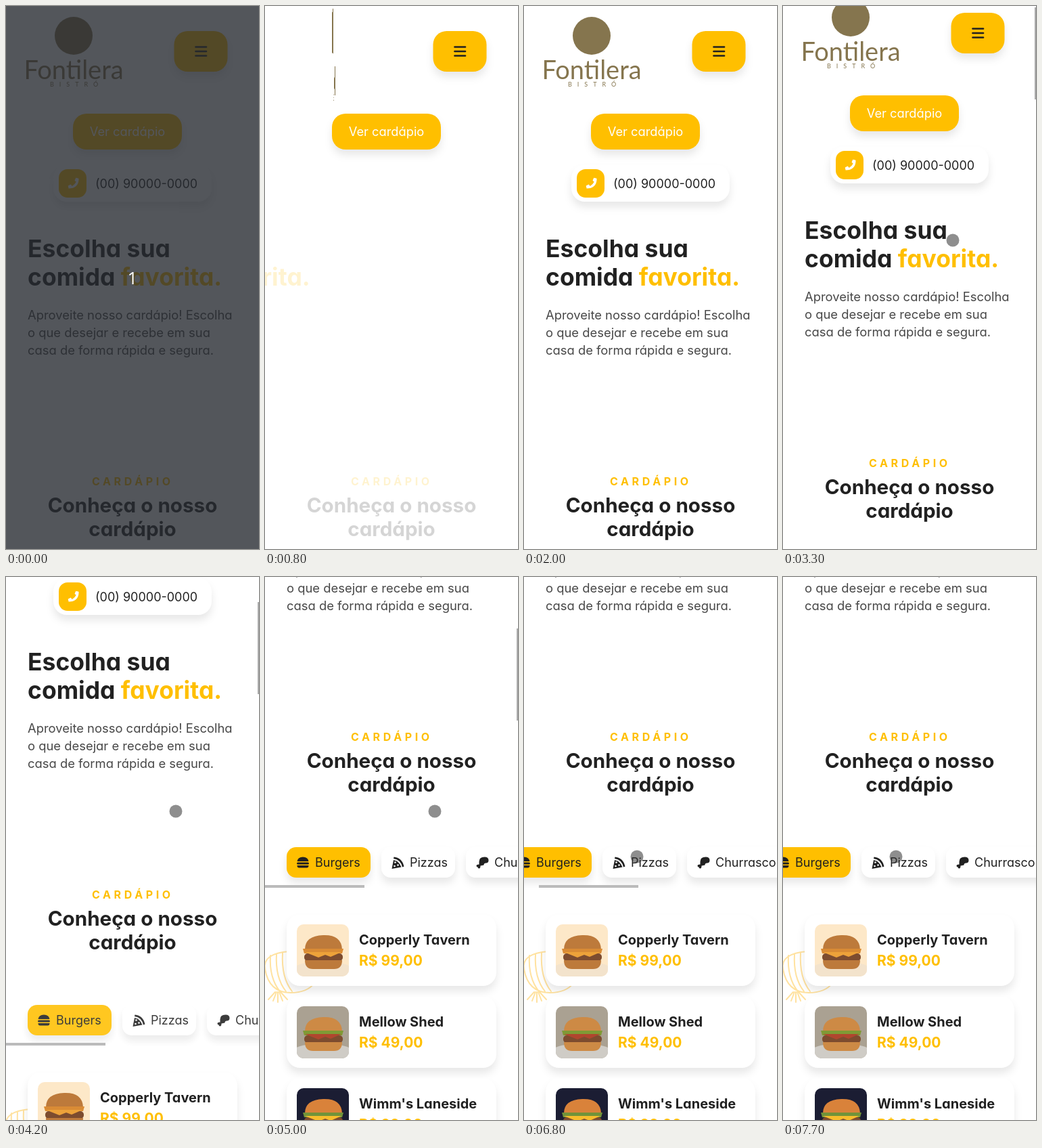
An HTML page that plays this animation: 374x802 px, repeating every 8 s.

```html
<!DOCTYPE html>
<html lang="pt-BR">
<head>
<meta charset="utf-8">
<title>Cardápio</title>
<style>
html, body { margin: 0; width: 100%; height: 100%; overflow: hidden; background: #fff; }
#stage { position: absolute; left: 0; top: 0; width: 374px; height: 802px; overflow: hidden; background: #fff; }
#stage svg, #stage div { position: absolute; left: 0; top: 0; }
svg { font-family: Inter, "Open Sans", sans-serif; font-feature-settings: "cv11"; font-size: 18px; fill: #212121; overflow: visible; }
.gold { fill: #ffbf00; }
.white { fill: #fff; }
.lift { filter: drop-shadow(0 8px 6px rgba(0, 0, 0, .09)); }
.big { font-size: 35.5px; font-weight: 700; }
.mid { font-size: 29.6px; font-weight: 700; text-anchor: middle; }
.tag { font-size: 16px; font-weight: 700; letter-spacing: 4.6px; }
.para { font-size: 18.4px; fill: #484848; }
.name { font-size: 20px; font-weight: 700; }
.price { font-size: 21px; font-weight: 700; }
.onion { fill: none; stroke: #ffe2a0; stroke-width: 2; stroke-linecap: round; }
#logo { transform-origin: 100px 67px; fill: #85754e; font-family: Lato, sans-serif; }
#stage #vbar { left: 372px; width: 2px; height: 136px; background: #aaa; }
#stage #dot { left: -9.5px; top: -9.5px; width: 19px; height: 19px; border-radius: 50%; background: rgba(50, 50, 50, .55); }
#stage #cover { width: 374px; height: 802px; background: rgba(38, 42, 49, .793); color: #fff; font: 26px/802px "Open Sans", sans-serif; text-align: center; }
</style>
</head>
<body>
<div id="stage">
  <div id="page">
    <svg width="374" height="1320" viewBox="0 0 374 1320">
      <clipPath id="round"><rect width="77" height="77" rx="10"/></clipPath>

      <rect class="gold lift" x="248.5" y="37" width="79" height="60" rx="20"/>
      <path d="M280.500 60.500h15.500m-15.500 6.500h15.500m-15.500 6.500h15.500" stroke="#212121" stroke-width="2.7" stroke-linecap="round"/>
      <rect class="gold lift" x="99" y="159" width="161" height="53" rx="20"/>
      <text class="white" x="179.5" y="192" text-anchor="middle" font-size="18.3">Ver cardápio</text>

      <g id="phone">
        <rect class="white lift" x="70" y="235" width="234" height="54" rx="20"/>
        <rect class="gold" x="78" y="241" width="41" height="42" rx="13"/>
        <path class="white" transform="translate(90 253.5)" d="M17 1l-3.800-.8-1.700 4 2.200 2q-2.200 4.300-6 6.200l-2-2.300-4 1.800.9 4q14.500 0 15-14z"/>
        <text x="132" y="269">(00) 90000-0000</text>
      </g>

      <g id="head" class="big">
        <text x="32" y="371">Escolha sua</text>
        <text x="32" y="413">comida <tspan class="gold">favorita.</tspan></text>
      </g>

      <g id="para" class="para">
        <text x="32" y="463">Aproveite nosso cardápio! Escolha</text>
        <text x="32" y="489">o que desejar e recebe em sua</text>
        <text x="32" y="515">casa de forma rápida e segura.</text>
      </g>

      <g id="menu">
        <text class="tag gold" x="127" y="708">CARDÁPIO</text>
        <text class="mid" x="187" y="748">Conheça o nosso</text>
        <text class="mid" x="187" y="783">cardápio</text>
      </g>

      <g id="tabs"></g>
      <rect id="hbar" y="921" width="147" height="4" fill="#bbb"/>
      <path id="onion" class="onion"/>
      <g id="cards"></g>
    </svg>
    <svg id="logo" width="200" height="134" viewBox="0 0 200 134">
      <circle cx="100" cy="44" r="28"/>
      <text x="100" y="108" text-anchor="middle" font-size="38">Fontilera</text>
      <text x="65" y="119" font-size="9" letter-spacing="8">BISTRÓ</text>
    </svg>
  </div>
  <div id="vbar"></div>
  <div id="dot"></div>
  <div id="cover">1</div>
</div>
<script>
const $ = id => document.getElementById(id);

const icons = {
  bun: '<path d="M0 6.500Q1 0 8.500 0T17 6.500zM1 8h15a1.500 1.500 0 0 1 0 3H1a1.500 1.500 0 0 1 0-3zM0 12.500h17q0 3.500-3 3.500H3q-3 0-3-3.500z"/>',
  slice: '<path d="M3 0Q15 1 18 14l-2.500 1Q13 4 2.500 2.600z"/><path d="M2.500 4.500Q11 6 14 15L0 17.500z"/><g class="white"><circle cx="5" cy="8" r="1.3"/><circle cx="9" cy="12" r="1.3"/><circle cx="4" cy="13.5" r="1.3"/></g>',
  leg: '<path d="M18 5q0 4-4 4-3 0-3 3l-5 1q0 4-2 4-2 0-2-2-2 0-2-2 0-2 4-2V7q0-7 8-7 6 0 6 5z"/>'
};
let left = 32;
const tab = (width, label, icon, cls) => {
  const x = left;
  left += width + 16;
  return `<rect class="${cls} lift" x="${x}" y="865" width="${width}" height="45" rx="14"/>
    <g transform="translate(${x + 15.5} 879.5)">${icons[icon]}</g>
    <text x="${x + 42}" y="894">${label}</text>`;
};
$('tabs').innerHTML = tab(124, 'Burgers', 'bun', 'gold') +
  tab(109, 'Pizzas', 'slice', 'white') + tab(150, 'Churrasco', 'leg', 'white');

// Onion: outline, ribs, then roots
let onion = 'M36 1019Q-4 1022 0 1045Q6 1080 38 1080Q62 1080 73 1066';
for (let i = 0; i < 3; i++) onion += `M${8 + i * 9} ${1025 - i * 2}Q${6 + i * 9} 1058 ${22 + i * 9} 1078`;
for (let i = 0; i < 5; i++) onion += `M${15 + i * 2} 1079l${i * 5 - 10} ${15 - Math.abs(i - 2) * 2}`;
$('onion').setAttribute('d', onion);

const photo = (wall, table, bun, sauce, leaf) =>
  `<rect width="77" height="77" fill="${wall}"/>
   <ellipse cx="38" cy="68" rx="46" ry="13" fill="${table}"/>
   <path fill="${bun}" d="M12 37Q12 17 39 16T67 37z"/>
   <path fill="${leaf}" d="M9 36h60l-2 7H11z"/>
   <rect x="11" y="43" width="57" height="11" rx="5" fill="#7d4c2f"/>
   <path fill="${sauce}" d="M12 41h54L50 48l-8-3-10 4z"/>
   <path fill="${bun}" d="M12 53h55q0 13-12 13H24Q12 66 12 53z"/>`;
const items = [
  ['Copperly Tavern', '99,00', photo('#fde8c8', '#f3e3cc', '#bd7a3b', '#eda23a', '#d98b35')],
  ['Mellow Shed', '49,00', photo('#aaa192', '#cfccc6', '#cd8a45', '#b0462e', '#7f9a35')],
  ["Wimm's Laneside", '99,00', photo('#1b1d33', '#ddd6cf', '#d9823a', '#f7bd2c', '#71933a')]
];
$('cards').innerHTML = items.map(([name, cost, art], i) =>
  `<g transform="translate(32 ${965 + i * 121})">
     <rect class="white lift" width="310" height="105" rx="20"/>
     <g transform="translate(15 14)"><g clip-path="url(#round)">${art}</g></g>
     <text class="name" x="107" y="44">${name}</text>
     <text class="price gold" x="107" y="75">R$ ${cost}</text>
   </g>`).join('');

// Entrance effects, driven by the clock
const enter = (id, frames, delay, duration, easing) => {
  const a = $(id).animate(frames, { delay, duration, easing, fill: 'both' });
  a.pause();
  return a;
};
const fade = [{ opacity: 0 }, { opacity: 1 }];
const spin = (offset, z, deg, scale, easing) =>
  ({ offset, easing, transform: `perspective(400px) scale(${scale}) translateZ(${z}px) rotateY(${deg}deg)` });
const entrances = [
  enter('logo', [
    spin(0, 0, -360, 1, 'ease-out'), spin(.4, 150, -190, 1, 'ease-out'),
    spin(.5, 150, -170, 1, 'ease-in'), spin(.8, 0, 0, .95, 'ease-in'), spin(1, 0, 0, 1, 'linear')
  ], 650, 1000, 'linear'),
  enter('head', [{ opacity: 0, transform: 'translateX(-310px)' }, { opacity: 1, transform: 'none' }], 650, 1000, 'ease'),
  enter('menu', fade, 650, 1000, 'ease'),
  enter('phone', fade, 950, 1000, 'ease'),
  enter('para', fade, 1450, 500, 'ease')
];

const part = (t, from, to) => Math.min(1, Math.max(0, (t - from) / (to - from)));
const ramp = (t, from, to) => {
  const p = part(t, from, to);
  return p * p * (3 - 2 * p);
};

// Pointer: start, then moves of [from, to, dx, dy]
const moves = [[2300, 2400, 90, 48], [2900, 3000, 19, 29], [5400, 5600, 3, 69],
  [5600, 5800, -14, 12], [5800, 6000, 0, 4], [6500, 6800, -73, -18]];
const pointer = t => {
  let x = 141.5, y = 268.5;
  for (const [from, to, dx, dy] of moves) {
    const p = part(t, from, to);
    x += dx * p;
    y += dy * p;
  }
  const swing = Math.sin(Math.PI * part(t, 6900, 7700));
  return [x + 148 * swing, y - 4 * swing];
};

function draw(now) {
  const t = Math.floor(now % 8000 / 100) * 100;
  const y = 54 * ramp(t, 3200, 3400) + 179 * ramp(t, 3500, 4200) + 233 * ramp(t, 4600, 5000);
  const x = 56 * ramp(t, 6500, 6800);
  const [px, py] = pointer(t);
  entrances.forEach(a => a.currentTime = t < 400 ? 7900 : t);
  $('logo').style.visibility = t >= 400 && t < 600 ? 'hidden' : 'visible';
  $('cover').style.display = t < 100 ? 'block' : 'none';
  $('page').style.transform = `translateY(${-Math.round(y)}px)`;
  $('tabs').setAttribute('transform', `translate(${-x} 0)`);
  $('tabs').style.opacity = ramp(t, 3500, 4400);
  $('hbar').setAttribute('x', x * .393);
  $('hbar').style.opacity = 1 - ramp(t, 6900, 7200);
  $('vbar').style.transform = `translateY(${Math.round(y * .169 - 2.5)}px)`;
  $('vbar').style.opacity = ramp(t, 3200, 3300) - ramp(t, 5300, 5600);
  $('dot').style.display = t < 2300 ? 'none' : 'block';
  $('dot').style.transform = `translate(${px}px, ${py}px)`;
}

let start;
function tick(now) {
  start ??= now;
  draw(now - start);
  requestAnimationFrame(tick);
}
draw(0);
requestAnimationFrame(tick);
</script>
</body>
</html>
```
